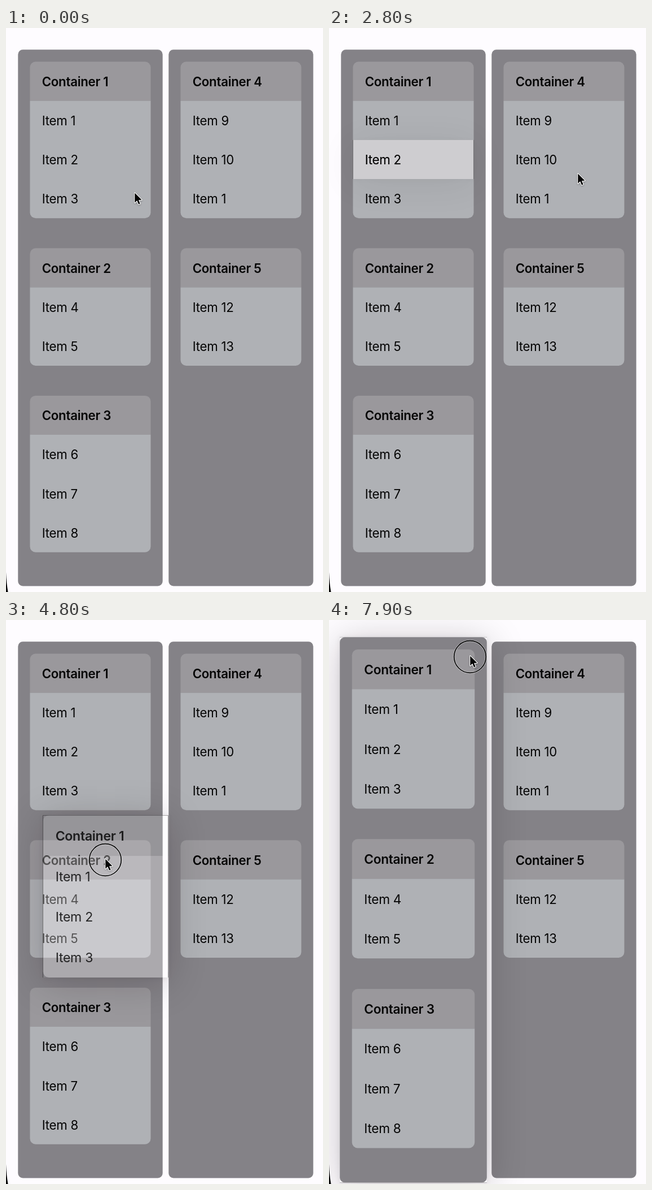
An HTML page with a canvas for the animation above (8 s loop, 562 px wide and 997 px high).

```html
<!DOCTYPE html>
<html lang="en">
<head>
<meta charset="utf-8">
<title>Nested drag and drop</title>
<style>
  html, body { margin: 0; width: 100%; height: 100%; overflow: hidden; background: #fefcff; }
  canvas { display: block; width: 562px; height: 997px; }
</style>
</head>
<body>
<canvas id="stage"></canvas>
<script>
const W = 562, H = 997, LOOP = 8000, STEP = 100;
const ROW = 69.2, BOX_W = 214, GAP = 53, PAD = 21.2;
const COL_Y = 38.3, COL_W = 256.4, COL_H = 948.2;
const PAPER = '#fefcff', GRAY = '#848287', INK = '#050505';
const SOLID = { head: '#9a989c', body: '#afb1b5' };
const GLASS = { head: 'rgba(255,250,253,.18)', body: 'rgba(255,250,253,.38)' };
const FONT = '22.3px Inter, Roboto, "Liberation Sans", sans-serif';

const canvas = document.getElementById('stage');
const dpr = window.devicePixelRatio || 1;
canvas.width = W * dpr;
canvas.height = H * dpr;
const ctx = canvas.getContext('2d');

const ramp = (t, from, to) => Math.min(1, Math.max(0, (t - from) / (to - from)));
const within = (t, from, to) => t >= from && t < to;
const easeOut = f => 1 - (1 - f) ** 2;
const easeInOut = f => f < .5 ? 2 * f * f : 1 - 2 * (1 - f) ** 2;

function makeColumn(x, boxes) {
  let y = COL_Y + PAD;
  return {
    x, y: COL_Y, w: COL_W, h: COL_H, r: 8.5,
    boxes: boxes.map(([name, ...items]) => {
      const box = { name, items, x: x + PAD, y, w: BOX_W, h: ROW * (items.length + 1), r: 10 };
      y += box.h + GAP;
      return box;
    })
  };
}

const left = makeColumn(21.3, [[1, 1, 2, 3], [2, 4, 5], [3, 6, 7, 8]]);
const right = makeColumn(288.3, [[4, 9, 10, 1], [5, 12, 13]]);
const firstBox = left.boxes[0];
const secondItem = { x: firstBox.x, y: firstBox.y + 2 * ROW, w: BOX_W, h: ROW, r: 0 };

// Pointer strokes, each eased out towards its end point.
const POINTER_START = { x: 228, y: 293 };
const STROKES = [
  { from: 100, to: 400, x: 175, y: 236 },
  { from: 1200, to: 1800, x: 430, y: 280 },
  { from: 1800, to: 2200, x: 441, y: 259 },
  { from: 2800, to: 3400, x: 149, y: 94 },
  { from: 4200, to: 4400, x: 176, y: 268 },
  { from: 4400, to: 4800, x: 176, y: 424 },
  { from: 4800, to: 5300, x: 168, y: 468 },
  { from: 5800, to: 6400, x: 150, y: 6 },
  { from: 6500, to: 6800, x: 146.5, y: 41.5 },
  { from: 7800, to: 7900, x: 250, y: 65 }
];

function pointerAt(t) {
  return STROKES.reduce((p, s) => {
    const f = easeOut(ramp(t, s.from, s.to));
    return { x: p.x + (s.x - p.x) * f, y: p.y + (s.y - p.y) * f };
  }, POINTER_START);
}

// A lifted shape grows, trails the pointer by `lag`, then flies home after release.
const DRAGS = [
  { shape: secondItem, draw: drawItem, grow: .115, lag: 80,
    lift: 800, pull: 1300, release: 2300, home: 2800, gone: 3500 },
  { shape: firstBox, draw: box => drawBox(box, GLASS), grow: .055, lag: 210,
    lift: 3900, pull: 4400, release: 5350, home: 5900, gone: 6600 },
  { shape: left, draw: drawSheet, grow: .0165, lag: 500,
    lift: 7400, pull: LOOP, release: LOOP, home: LOOP + 500, gone: LOOP }
];

function poseAt(drag, t) {
  const { shape } = drag;
  const cx = shape.x + shape.w / 2, cy = shape.y + shape.h / 2;
  const up = easeOut(ramp(t, drag.lift - 100, drag.lift + 300));
  const pulled = ramp(t, drag.pull, drag.pull + 300);
  const away = 1 - easeInOut(ramp(t, drag.release, drag.home));
  const growth = drag.grow * up * (1 - .35 * pulled);
  const grab = pointerAt(drag.lift);
  const p = pointerAt(Math.min(t, drag.release) - drag.lag);
  return {
    x: cx + (p.x - grab.x + (cx - grab.x) * growth * pulled) * away,
    y: cy + (p.y - grab.y + (cy - grab.y) * growth * pulled) * away,
    scale: 1 + growth * away,
    alpha: 1 - .17 * pulled * away,
    shadow: up * (1 - ramp(t, drag.release, drag.release + 750))
  };
}

function fillRound(x, y, w, h, r, color) {
  ctx.beginPath();
  ctx.roundRect(x, y, w, h, r);
  ctx.fillStyle = color;
  ctx.fill();
}

function label(text, x, top, weight) {
  ctx.font = weight + ' ' + FONT;
  ctx.letterSpacing = '-0.3px';
  ctx.fillStyle = INK;
  ctx.fillText(text, x + 21.2, top + 43.2);
}

function drawBox(box, tone) {
  const { x, y, w, h, r } = box;
  fillRound(x, y, w, ROW, [r, r, 0, 0], tone.head);
  fillRound(x, y + ROW, w, h - ROW, [0, 0, r, r], tone.body);
  label('Container ' + box.name, x, y, 600);
  box.items.forEach((n, i) => label('Item ' + n, x, y + ROW * (i + 1), 400));
}

function drawColumn(col) {
  fillRound(col.x, col.y, col.w, col.h, col.r, GRAY);
  col.boxes.forEach(box => drawBox(box, SOLID));
}

function drawSheet(col) {
  fillRound(col.x, col.y, col.w, col.h, 0, PAPER);
  drawColumn(col);
}

function drawItem(item) {
  fillRound(item.x, item.y, item.w, item.h, 0, GLASS.body);
  label('Item 2', item.x, item.y, 400);
}

// Shadow falls only outside the lifted shape.
function castShadow({ x, y, w, h }, strength) {
  ctx.save();
  ctx.beginPath();
  ctx.rect(-2 * W, -2 * H, 5 * W, 5 * H);
  ctx.rect(x, y, w, h);
  ctx.clip('evenodd');
  for (const [blur, alpha, drop] of [[64, .22, 8], [10, .08, 1]]) {
    ctx.shadowColor = `rgba(20,8,12,${alpha * strength})`;
    ctx.shadowBlur = blur * dpr;
    ctx.shadowOffsetY = drop * dpr;
    fillRound(x, y, w, h, 0, '#000');
  }
  ctx.restore();
}

function drawDrag(drag, t) {
  const { shape } = drag;
  const pose = poseAt(drag, t);
  ctx.save();
  ctx.translate(pose.x, pose.y);
  ctx.scale(pose.scale, pose.scale);
  ctx.translate(-shape.x - shape.w / 2, -shape.y - shape.h / 2);
  if (pose.shadow > 0) castShadow(shape, pose.shadow);
  ctx.globalAlpha = pose.alpha;
  drag.draw(shape);
  ctx.restore();
}

function drawRing(x, y) {
  ctx.beginPath();
  ctx.arc(x, y, 28.3, 0, 2 * Math.PI);
  for (const [width, color] of [[3.4, 'rgba(255,255,255,.4)'], [1.7, INK]]) {
    ctx.lineWidth = width;
    ctx.strokeStyle = color;
    ctx.stroke();
  }
}

function drawArrow(x, y) {
  ctx.save();
  ctx.translate(x + .3, y - 1.4);
  ctx.scale(1.04, 1.04);
  const arrow = new Path2D('M0 0V16.6L3.8 13L6.5 19.2L9.1 18.1L6.5 12.1L11.8 11.8Z');
  ctx.lineJoin = 'round';
  ctx.lineWidth = 2.2;
  ctx.strokeStyle = '#fff';
  ctx.shadowColor = 'rgba(0,0,0,.3)';
  ctx.shadowBlur = 3 * dpr;
  ctx.shadowOffsetY = dpr;
  ctx.stroke(arrow);
  ctx.shadowColor = 'transparent';
  ctx.fillStyle = INK;
  ctx.fill(arrow);
  ctx.restore();
}

function drawCorner() {
  ctx.beginPath();
  ctx.moveTo(0, 962);
  ctx.quadraticCurveTo(.8, 982, 3.6, H);
  ctx.lineTo(0, H);
  ctx.fillStyle = INK;
  ctx.fill();
}

function render(t) {
  ctx.setTransform(dpr, 0, 0, dpr, 0, 0);
  ctx.fillStyle = PAPER;
  ctx.fillRect(0, 0, W, H);
  drawColumn(left);
  drawColumn(right);
  for (const drag of DRAGS) {
    if (within(t, drag.lift, drag.gone)) drawDrag(drag, t);
  }
  drawCorner();

  const { x, y } = pointerAt(t);
  const pressed = within(t, 400, 2400) || within(t, 3600, 5500) || t >= 7000;
  if (pressed) drawRing(x, y);
  drawArrow(x, y);
}

const start = performance.now();
function tick() {
  const t = (performance.now() - start) % LOOP;
  render(Math.floor(t / STEP) * STEP);
  requestAnimationFrame(tick);
}
tick();
</script>
</body>
</html>
```
